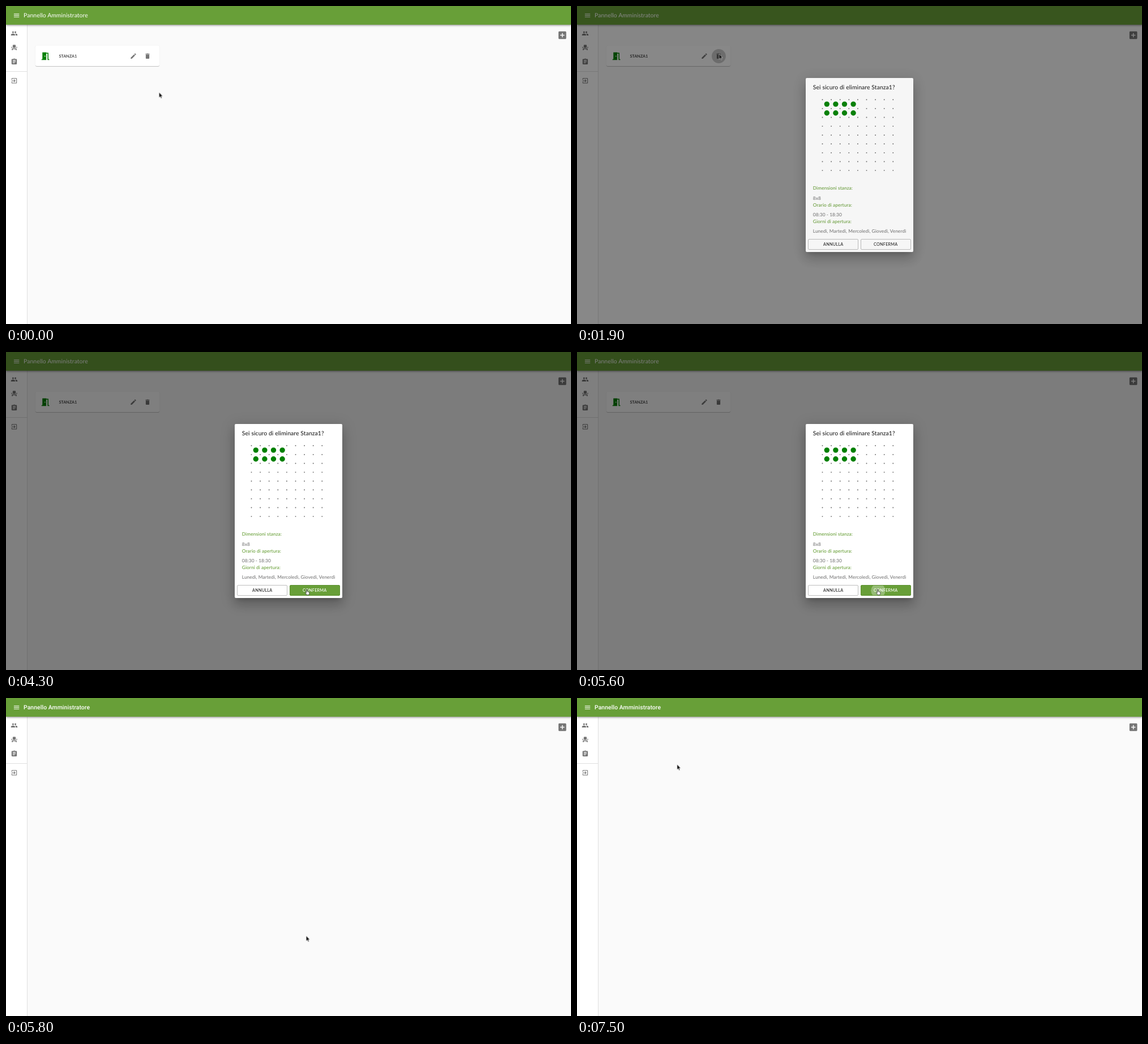
Animation of 998 by 561 pixels, one loop 8300 ms. Source, as an HTML page:

```html
<!DOCTYPE html>
<html lang="it">
<head>
<meta charset="utf-8">
<title>Pannello Amministratore</title>
<style>
  html, body { margin: 0; width: 100%; height: 100%; overflow: hidden; background: #fafafa; }
  #stage { position: absolute; left: 0; top: 0; width: 998px; height: 561px; overflow: hidden; background: #fafafa; }
  #stage div, #stage svg { position: absolute; box-sizing: border-box; }
  .layer { left: 0; top: 0; width: 998px; height: 561px; overflow: visible; }

  #drawer { left: 0; top: 0; width: 38px; height: 561px; background: #fff; border-right: 1px solid #e0e0e0; }
  #rule { left: 0; top: 114.5px; width: 37.5px; height: 1px; background: #e0e0e0; }
  #bar {
    left: 0; top: 0; width: 998px; height: 33.3px; background: #689f38;
    box-shadow: 0 1px 2px -.5px rgba(0,0,0,.2), 0 2px 2.6px rgba(0,0,0,.14), 0 .5px 5.2px rgba(0,0,0,.12);
  }
  #paper {
    left: 52px; top: 70px; width: 218.6px; height: 36.4px; background: #fff; border-radius: 2px;
    box-shadow: 0 1px .5px -.5px rgba(0,0,0,.2), 0 .5px .5px rgba(0,0,0,.14), 0 .5px 1.6px rgba(0,0,0,.12);
  }
  #halo, #ripple { left: 237.6px; top: 76px; width: 24.8px; height: 24.8px; border-radius: 50%; }
  #halo { background: rgba(0,0,0,.05); }
  #ripple { background: rgba(0,0,0,.17); }

  #backdrop { background: rgba(0,0,0,.5); }
  #modal {
    left: 404.4px; top: 126.7px; width: 189.2px; height: 307.5px; background: #fff; border-radius: 2px;
    box-shadow: 0 5.7px 7.8px -3.6px rgba(0,0,0,.2), 0 12.5px 19.8px 1.6px rgba(0,0,0,.14), 0 4.7px 24px 4.2px rgba(0,0,0,.12);
  }
  .button {
    top: 411.3px; width: 89px; height: 18.9px; border: .8px solid rgba(0,0,0,.25); border-radius: 2px;
    display: flex; align-items: center; justify-content: center; overflow: hidden;
    font: 500 7.28px/1 Lato, sans-serif; letter-spacing: .0286em; color: rgba(0,0,0,.87);
  }
  #hover { border-color: #5d9130; background: #689f38; color: #fff; }
  #splash { left: -12px; top: -33px; width: 84px; height: 84px; border-radius: 50%; background: rgba(255,255,255,.3); }

  text { font-family: Lato, sans-serif; font-size: 8.32px; letter-spacing: .0094em; fill: rgba(0,0,0,.58); text-rendering: geometricPrecision; }
  .title { font-size: 10.4px; letter-spacing: .0075em; fill: #fff; }
  .roboto { font-family: Roboto, sans-serif; font-weight: 500; }
  .ask { font-size: 10.4px; font-weight: 500; letter-spacing: .0075em; fill: rgba(0,0,0,.87); }
  .room { font-size: 7.28px; font-weight: 500; letter-spacing: 0; fill: rgba(0,0,0,.87); }
  .head { fill: #689f38; font-weight: 500; }
</style>
</head>
<body>
<div id="stage">
  <div id="drawer"></div>
  <div id="rule"></div>
  <div id="bar"></div>
  <svg id="pageArt" class="layer">
    <text id="titleA" class="title" x="31" y="19.8">Pannello Amministratore</text>
    <text id="titleB" class="title roboto" x="31" y="20.2">Pannello Amministratore</text>
  </svg>
  <div id="card" class="layer">
    <div id="paper"></div>
    <div id="halo"></div>
    <svg id="cardArt" class="layer"><text class="room" x="93.4" y="90.5">STANZA1</text></svg>
    <div id="ripple"></div>
  </div>
  <div id="backdrop" class="layer"></div>
  <div id="dialog" class="layer">
    <div id="modal"></div>
    <svg id="dialogArt" class="layer">
      <text class="ask" x="416.8" y="146.5">Sei sicuro di eliminare Stanza1?</text>
      <text class="head" x="416.8" y="324.2">Dimensioni stanza:</text>
      <text x="416.8" y="341.8">8x8</text>
      <text class="head" x="416.8" y="353.7">Orario di apertura:</text>
      <text x="416.8" y="371">08:30 - 18:30</text>
      <text class="head" x="416.8" y="382.9">Giorni di apertura:</text>
      <text x="416.8" y="400">Lunedì, Martedì, Mercoledì, Giovedì, Venerdì</text>
    </svg>
    <div class="button" style="left:408.2px">ANNULLA</div>
    <div class="button" style="left:500.8px">CONFERMA</div>
    <div id="hover" class="button" style="left:500.8px">CONFERMA<div id="splash"></div></div>
  </div>
  <svg id="cursor" class="layer">
    <path id="arrow" d="M0 0V9.2L2.1 7.2 3.6 10.4 5 9.8 3.6 6.7H6.3Z" fill="#111" stroke="#fff" stroke-width=".5"/>
    <path id="hand" d="M.1 4.6V0Q.1-.9.8-.9T1.6 0V3Q2.3 2.6 2.9 3.3 3.6 2.9 4.2 3.7 5.5 3.4 5.5 4.8V6.2Q5.4 7.6 4.7 8.9H.9Q-.2 7.4-1.4 5.6-1.6 4.7-.8 4.6-.3 4.7.1 5.3Z" fill="#fff" stroke="#111" stroke-width=".7"/>
  </svg>
</div>
<script>
const LOOP = 8300;
const $ = id => document.getElementById(id);

function add(parent, tag, attrs) {
  const el = document.createElementNS('http://www.w3.org/2000/svg', tag);
  for (const name in attrs) el.setAttribute(name, attrs[name]);
  parent.append(el);
}

function icon(parent, cx, cy, size, fill, d) {
  add(parent, 'path', { d, fill, transform: `translate(${cx - size / 2} ${cy - size / 2}) scale(${size / 24})` });
}

const GREY = '#757575', SMALL = 12.48, LARGE = 18.2;
const page = $('pageArt'), card = $('cardArt'), dialog = $('dialogArt');

icon(page, 18.6, 16.6, SMALL, '#fff', 'M3 18h18v-2H3v2zm0-5h18v-2H3v2zm0-7v2h18V6H3z');
icon(page, 14.5, 48.3, SMALL, GREY, 'M16 11c1.66 0 2.99-1.34 2.99-3S17.66 5 16 5c-1.66 0-3 1.34-3 3s1.34 3 3 3zm-8 0c1.66 0 2.99-1.34 2.99-3S9.66 5 8 5C6.34 5 5 6.34 5 8s1.34 3 3 3zm0 2c-2.33 0-7 1.17-7 3.5V19h14v-2.5c0-2.33-4.67-3.5-7-3.5zm8 0c-.29 0-.62.02-.97.05 1.16.84 1.97 1.97 1.97 3.45V19h6v-2.5c0-2.33-4.67-3.5-7-3.5z');
icon(page, 14.5, 73.2, SMALL, GREY, 'M4 18v3h3v-3h10v3h3v-6H4zm15-8h3v3h-3zM2 10h3v3H2zm15 3H7V5c0-1.1.9-2 2-2h6c1.1 0 2 .9 2 2v8z');
icon(page, 14.5, 98.2, SMALL, GREY, 'M19 3h-4.18C14.4 1.84 13.3 1 12 1c-1.3 0-2.4.84-2.82 2H5c-1.1 0-2 .9-2 2v14c0 1.1.9 2 2 2h14c1.1 0 2-.9 2-2V5c0-1.1-.9-2-2-2zm-7 0c.55 0 1 .45 1 1s-.45 1-1 1-1-.45-1-1 .45-1 1-1zm2 14H7v-2h7v2zm3-4H7v-2h10v2zm0-4H7V7h10v2z');
icon(page, 14.5, 131.9, SMALL, GREY, 'M10.09 15.59L11.5 17l5-5-5-5-1.41 1.41L12.67 11H3v2h9.67l-2.58 2.59zM19 3H5c-1.11 0-2 .9-2 2v4h2V5h14v14H5v-4H3v4c0 1.1.89 2 2 2h14c1.1 0 2-.9 2-2V5c0-1.1-.9-2-2-2z');
icon(page, 982.7, 51.5, LARGE, GREY, 'M19 3H5c-1.11 0-2 .9-2 2v14c0 1.1.89 2 2 2h14c1.1 0 2-.9 2-2V5c0-1.1-.9-2-2-2zm-2 10h-4v4h-2v-4H7v-2h4V7h2v4h4v2z');
icon(card, 69.6, 88.5, LARGE, '#008000', 'M14 6v15H3v-2h2V3h9v1h5v15h2v2h-4V6h-3zm-4 5v2h2v-2h-2z');
icon(card, 225, 88.4, SMALL, GREY, 'M3 17.25V21h3.75L17.81 9.94l-3.75-3.75L3 17.25zM20.71 7.04c.39-.39.39-1.02 0-1.41l-2.34-2.34c-.39-.39-1.02-.39-1.41 0l-1.83 1.83 3.75 3.75 1.83-1.83z');
icon(card, 250, 88.4, SMALL, GREY, 'M6 19c0 1.1.9 2 2 2h8c1.1 0 2-.9 2-2V7H6v12zM19 4h-3.5l-1-1h-5l-1 1H5v2h14V4z');

// Room plan: 9x9 grid points, two rows of four seats
const CELL = 15.6;
for (let i = 0; i < 81; i++) {
  add(dialog, 'circle', { cx: 433.5 + i % 9 * CELL, cy: 165.3 + Math.floor(i / 9) * CELL, r: .95, fill: '#666' });
}
for (let i = 0; i < 8; i++) {
  add(dialog, 'circle', { cx: 441.3 + i % 4 * CELL, cy: 173.1 + Math.floor(i / 4) * CELL, r: 4.7, fill: '#008000' });
}

function play(id, steps) {
  const frames = steps.map(([t, style]) => ({ ...style, offset: t / LOOP, easing: 'step-end' }));
  frames.push({ ...steps[steps.length - 1][1], offset: 1 });
  $(id).animate(frames, { duration: LOOP, iterations: Infinity });
}

const fade = (id, steps) => play(id, steps.map(([t, opacity]) => [t, { opacity }]));
const at = (x, y) => ({ transform: `translate(${x}px, ${y}px)` });
const smooth = p => p * p * (3 - 2 * p);

function glide(start, count, [x0, y0], [x1, y1]) {
  return Array.from({ length: count }, (_, i) => {
    const p = smooth((i + 1) / count);
    return [start + i * 100, at(x0 + (x1 - x0) * p, y0 + (y1 - y0) * p)];
  });
}

const rest = [270.4, 152.4], bin = [251, 84.6], mid = [474.5, 199.5],
      low = [507, 306.5], confirm = [530.3, 419.6], side = [260.5, 214.5];
const wander = [[236, 172], [190, 98], [120, 42], [66, 22], [46, 52], [58, 92], [98, 114], [142, 120], [167.5, 119], [176.8, 117.2]];

play('cursor', [
  [0, at(...rest)],
  ...glide(700, 7, rest, bin),
  ...glide(2000, 5, bin, mid),
  ...glide(2700, 3, mid, low),
  ...glide(3600, 6, low, confirm),
  ...glide(6100, 2, confirm, side),
  ...wander.map((p, i) => [6600 + i * 100, at(...p)])
]);
fade('arrow', [[0, 1], [4100, 0], [5800, 1]]);
fade('hand', [[0, 0], [4100, 1], [5800, 0]]);

fade('halo', [[0, 0], [1700, 1], [2000, 0]]);
play('ripple', [[0, 0, .3], [1700, .6, .35], [1800, 1, .65], [1900, 1, 1], [2000, .8, 1], [2100, .55, 1], [2200, .3, 1], [2300, .12, 1], [2400, 0, 1]]
  .map(([t, opacity, s]) => [t, { opacity, transform: `scale(${s})` }]));

const overlay = [[0, 0], [1800, .05], [1900, .93], [2000, 1], [5700, .21], [5800, 0]];
fade('backdrop', overlay);
fade('dialog', overlay);
fade('hover', [[0, 0], [4100, .4], [4200, .9], [4300, 1], [5800, 0]]);
play('splash', [[0, { opacity: 0, transform: 'scale(.3)' }], [5600, { opacity: 1, transform: 'scale(.3)' }], [5700, { opacity: 1, transform: 'scale(1)' }], [5800, { opacity: 0, transform: 'scale(1)' }]]);

fade('card', [[0, 1], [5800, 0]]);
fade('titleA', [[0, 1], [5800, 0]]);
fade('titleB', [[0, 0], [5800, 1]]);
</script>
</body>
</html>
```
